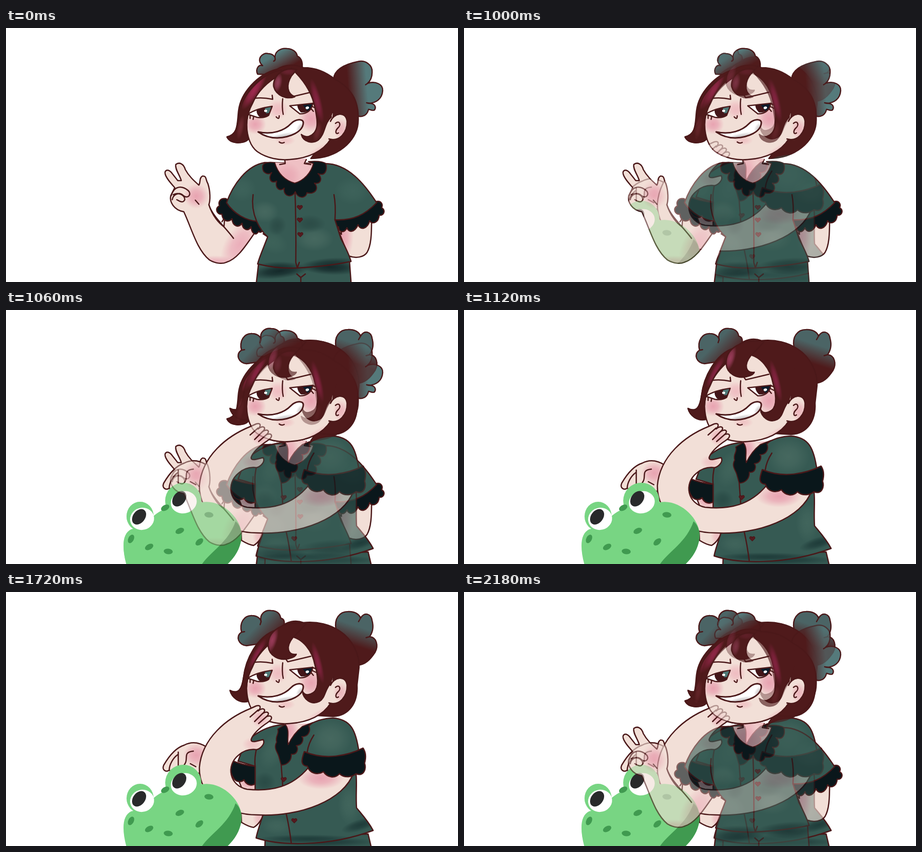
Recreate the animation shown at these times as an HTML page with a canvas. Size 900x506 px, loop 2240 ms.

```html
<!DOCTYPE html>
<html lang="en">
<meta charset="utf-8">
<title>Two poses</title>
<style>
  html, body { margin: 0; width: 100%; height: 100%; overflow: hidden; background: #fff; }
  canvas { display: block; }
</style>
<canvas id="stage" width="900" height="506"></canvas>
<script>
const INK = '#4a1819', HAIR = '#4f1a1b', WINE = '#852342', SKIN = '#f2dfd7', PINK = '#e8a3b1',
  SHIRT = '#365a53', LIGHT = '#46685f', SHADE = '#1f3c3a', BLACK = '#0a171b', TEAL = '#557a7b',
  FROG = '#78d583', MOSS = '#409a50';

let g;

function layer(paint) {
  const canvas = document.createElement('canvas');
  canvas.width = 900;
  canvas.height = 506;
  g = canvas.getContext('2d');
  g.lineCap = g.lineJoin = 'round';
  paint();
  return canvas;
}

// Soft elliptical patch of colour.
function glow([x, y, rx, ry, color, turn = 0]) {
  g.save();
  g.translate(x, y);
  g.rotate(turn);
  g.scale(rx, ry);
  const fade = g.createRadialGradient(0, 0, 0, 0, 0, 1);
  fade.addColorStop(0, color);
  fade.addColorStop(.45, color + 'bb');
  fade.addColorStop(1, color + '00');
  g.fillStyle = fade;
  g.fillRect(-1, -1, 2, 2);
  g.restore();
}

function line(d, width = 2.5, color = INK) {
  g.lineWidth = width;
  g.strokeStyle = color;
  g.stroke(new Path2D(d));
}

function shape(d, fill, glows = [], width = 2.5) {
  const path = new Path2D(d);
  g.fillStyle = fill;
  g.fill(path);
  g.save();
  g.clip(path);
  glows.forEach(glow);
  g.restore();
  if (width) line(d, width);
}

function oval(x, y, rx, ry, color, turn = 0) {
  g.fillStyle = color;
  g.beginPath();
  g.ellipse(x, y, rx, ry, turn, 0, 7);
  g.fill();
}

function blend(x0, y0, x1, y1, from, to) {
  const ramp = g.createLinearGradient(x0, y0, x1, y1);
  ramp.addColorStop(0, from);
  ramp.addColorStop(1, to);
  return ramp;
}

function heart(x, y) {
  shape(`M${x} ${y + 4}l-5 -5c-1 -4 4 -5 5 -1c1 -4 6 -3 5 1z`, '#571a20', [], 1.5);
}

function face() {
  shape('M545 92C512 105 480 150 479 192C480 217 486 235 500 246C520 260 545 264 565 262C602 260 632 245 646 222L652 170L618 118L575 82Z', SKIN, [
    [496, 192, 22, 20, PINK], [608, 181, 26, 27, PINK], [541, 162, 20, 20, '#efbcc1'],
    [556, 224, 20, 10, '#efc3c4'], [628, 248, 46, 14, '#edbfc2', -.5]]);
  line('M495 140Q512 138 531 142L530 134M561 139L607 128M556 132L561 139');
  line('M551 141Q549 158 552 172M538 177Q544 184 544 175');

  shape('M482 172Q499 160 530 156L523 174Q515 180 500 178Z', '#fff', [], 0);
  shape('M499 163Q513 157 530 156L523 174Q516 180 506 178Q498 172 499 163Z', '#421619', [], 0);
  shape('M515 158L530 156L525 169L518 170Z', '#4d7775', [], 0);
  oval(517, 165, 3, 2.5, '#fff');
  line('M481 172Q499 160 530 156L523 174Q515 180 500 178L482 172M486 175L486 180M493 177L492 182');

  shape('M565 155L611 150Q607 171 585 171Z', '#fff', [], 0);
  shape('M580 153L611 150Q608 170 587 168Q580 161 580 153Z', '#421619', [], 0);
  shape('M590 152L611 150Q609 164 600 165Z', '#0b1b2a', [], 0);
  oval(600, 159, 3.5, 2.5, '#fff', -.3);
  line('M565 155L611 150Q607 171 585 171ZM610 150L619 154M609 156L617 160M607 160L612 166');

  const mouth = 'M502 207C530 213 554 205 568 190C577 181 592 180 592 189C591 207 566 218 540 219C525 219 512 214 502 207Z';
  shape(mouth, '#fff', [[545, 219, 38, 8, '#c3bfc0', -.25], [587, 199, 8, 13, '#d4cfd0', .6]], 3);
  line('M544 227Q549 231 554 228');
}

function ear() {
  const rim = 'M646 186C652 170 677 164 679 186C680 208 664 227 643 221';
  shape(rim, SKIN, [[667, 201, 15, 21, '#ebb5bb']], 0);
  line(rim + 'M656 190C664 183 668 193 661 199C654 206 657 213 662 209');
}

function wavingPose() {
  shape('M501 92C496 82 503 72 511 75C497 63 510 48 522 51C530 51 536 56 536 62C533 47 547 39 560 41C573 42 579 49 580 56C590 60 592 73 588 86L540 94Z',
    blend(533, 55, 551, 86, TEAL, HAIR));
  line('M536 62Q536 65 533 66');
  shape('M652 102C654 82 675 72 700 67C716 63 730 74 729 88C729 100 725 106 720 110C736 105 751 112 750 125C749 140 738 150 721 150C733 149 738 156 734 163C731 166 726 163 722 162C718 178 704 179 694 172Z',
    blend(681, 119, 719, 116, HAIR, TEAL));
  line('M722 109L716 113M724 150L718 149');
  shape('M540 82C500 92 467 130 463 165C460 190 463 212 440 217C447 232 474 231 482 222L520 170L640 215L607 260C660 260 698 225 701 190C704 150 692 122 655 102C636 87 617 79 592 79C575 72 555 72 540 82Z', HAIR);

  shape('M503 468L497 520L688 520L684 465Z', SHIRT, [
    [545, 484, 60, 15, '#14292a', -.12], [645, 476, 62, 16, '#14292a', .05]]);
  line('M579 490L587 497L596 490M587 497V506');

  shape('M404 352C411 375 425 390 434 396L436 370L505 395C484 421 466 459 438 467C432 470 418 470 405 462C380 442 370 400 354 366C335 363 325 347 328 334L336 318C326 307 314 293 317 286C320 281 326 283 331 290L342 304L349 304C346 293 336 281 338 272C345 266 354 271 357 282C364 295 374 304 384 313C388 307 384 299 391 295C400 294 397 302 402 310C407 325 407 343 404 352Z', SKIN, [
    [379, 335, 25, 25, PINK], [465, 431, 29, 55, '#ebaeba', .55], [417, 468, 45, 15, '#ebaeba']]);
  line('M404 352C411 375 438 398 453 419M329 334C335 313 351 314 363 324C371 332 361 342 352 333C346 327 333 330 331 342M333 332C343 326 356 333 356 342C352 350 346 345 340 342M377 343L384 351');
  shape('M656 390L666 414L682 454C698 460 713 456 719 447C727 433 728 412 728 380Z', SKIN, [[670, 414, 22, 52, PINK]]);
  line('M667 402L668 411L663 406M430 386L438 374');

  shape('M438 340C427 338 422 346 425 354C415 360 420 372 430 371C431 385 443 388 450 380C451 395 463 399 470 389C471 402 482 406 488 396C489 410 498 415 503 405C509 411 514 401 508 394L500 380Z', BLACK);
  shape('M736 346C747 343 751 351 748 358C757 364 752 374 743 373C742 388 729 392 724 384C720 400 706 404 701 392C694 408 682 408 679 398C673 410 662 407 662 396C655 402 653 393 655 380Z', BLACK);
  shape('M515 268C479 274 452 312 439 348C455 372 479 383 499 385Q508 405 521 416C512 440 505 455 501 470Q540 480 580 478Q640 475 687 465C683 450 675 435 667 420L655 382C692 384 716 371 738 348C714 311 681 270 635 270Z', SHIRT, [
    [515, 366, 28, 22, LIGHT], [614, 420, 39, 25, LIGHT], [530, 427, 33, 22, '#3d6259', .4],
    [470, 320, 28, 26, '#3d625a'], [690, 324, 36, 28, '#3d625a'], [605, 390, 32, 18, '#2c4c47'],
    [540, 394, 18, 20, '#2c4c47', .5], [545, 478, 52, 13, '#1a3231'], [643, 471, 60, 13, '#1a3231', -.08]]);
  line('M499 385Q488 359 492 332M655 382Q657 353 653 332M521 416L512 410M575 313Q578 390 577 467L580 478L584 467');
  [[585, 358], [585, 383], [586, 412]].forEach(([x, y]) => heart(x, y));

  const neckline = 'C608 288 593 304 575 309C556 304 541 290 535 268';
  shape('M556 261L557 270L535 268L612 270' + neckline + 'L612 270L596 270L598 260Z', '#efc0c4', [[560, 295, 28, 28, '#e9a9b4']], 0);
  shape('M535 268C520 266 510 269 511 278C511 290 523 293 529 288C521 301 528 311 539 305C535 319 545 327 554 319C551 337 571 339 576 326C581 341 598 340 599 328C614 333 625 320 614 309C629 312 630 297 621 290C636 296 640 283 637 270C630 265 615 265 602 266L612 270' + neckline + 'Z', BLACK, [], 2);
  line('M555 262L556 270L545 272M598 262L594 270L607 272');
  face();
  ear();

  shape('M549 84C516 87 475 125 465 165C460 190 463 212 440 217C447 232 474 231 482 222C477 197 478 174 490 152C500 128 520 107 548 92Z', HAIR, [
    [494, 124, 12, 45, '#a02a50', .55], [467, 198, 7, 25, '#6e2a30', .2]]);
  shape('M568 80C586 97 606 122 613 150C622 187 624 208 603 216C596 218 591 214 588 212C592 228 611 231 622 223C636 211 633 190 648 177L662 128L628 86L590 80Z', HAIR, [
    [619, 145, 9, 46, WINE, -.25], [620, 207, 8, 21, '#69282d', .25]], 0);
  line('M568 80C586 97 606 122 613 150C622 187 624 208 603 216C596 218 591 214 588 212C592 228 611 231 622 223C636 211 633 190 648 177');
  shape('M579 83C549 76 530 99 533 117C538 135 559 143 575 137C560 131 557 114 568 96Z', HAIR, [
    [541, 109, 9, 20, '#94405a', .2], [562, 87, 18, 8, '#6a2330']]);
}

function frog() {
  oval(267, 411, 27, 29, FROG);
  oval(353, 380, 36, 36, FROG);
  shape('M240 508C230 472 232 445 249 437C280 432 291 405 318 396L390 383C430 376 470 416 469 449C468 475 454 494 440 508Z', FROG, [], 0);
  shape('M389 508C407 481 443 463 457 421Q470 432 469 454C466 478 454 494 439 508Z', MOSS, [], 0);
  [[271, 416, 24, 22, 265, 412], [354, 383, 26, 22, 345, 376]].forEach(([x, y, rx, ry, px, py]) => {
    oval(x, y, rx, ry, '#fff', -.25);
    oval(px, py, 12, 17, '#292a2b', .65);
  });
  [[317, 394, -.5], [404, 408, .1], [346, 440, -.4], [385, 462, -.7], [285, 472, -.5], [323, 481, .1], [249, 456, -1.1]]
    .forEach(([x, y, turn]) => oval(x, y, 9, 5.5, MOSS, turn));
}

function thinkingPose() {
  shape('M479 107C463 106 456 88 469 80C464 62 474 46 490 47C500 47 507 53 508 59C504 44 516 35 528 37C540 37 546 44 547 52C556 54 556 64 550 72L512 102Z',
    blend(495, 72, 528, 104, '#4b6465', HAIR));
  line('M508 59L506 65M469 80L475 79');
  shape('M657 74C653 53 664 39 681 39C696 38 704 46 706 52C714 39 727 43 729 57C733 72 729 82 724 89C738 90 742 107 735 120C725 135 715 146 698 146Z',
    blend(699, 68, 687, 104, '#4b6465', HAIR));
  line('M706 52L702 59M724 89L717 91');
  shape('M545 72C558 58 577 55 592 61C620 58 646 65 665 78C690 94 704 125 703 150L699 185C701 221 683 246 652 248L618 246L640 215L522 170L482 218C465 222 450 211 446 196C465 206 470 190 473 170C477 141 491 110 522 85Z', HAIR);

  shape('M516 492L515 520L730 520L721 482Z', SHIRT, [[630, 498, 110, 10, SHADE]]);
  shape('M468 440L469 459Q484 468 493 469Q507 461 515 438Z', SKIN, [[505, 451, 14, 18, '#edbcc0']]);
  shape('M400 309C386 300 370 297 355 305C339 310 325 326 314 345C310 354 318 360 325 355L333 361L389 361Z', SKIN, [[379, 325, 26, 24, PINK]]);
  line('M325 355C325 344 333 330 342 324M343 319V350M373 317C350 319 365 334 355 344M378 348L367 342');

  shape('M458 362Q475 368 500 378L500 397L470 392Z', SKIN, [[484, 378, 25, 18, PINK]]);
  shape('M555 264C514 266 474 292 468 321L462 337L496 347V400L513 440C505 465 500 478 498 490C543 505 640 509 731 475C721 456 707 441 698 430C696 399 700 374 696 355L703 320C697 276 687 253 650 251C628 252 617 258 605 263Z', SHIRT, [
    [646, 292, 42, 38, LIGHT], [530, 316, 24, 40, '#40645b', .4], [540, 466, 32, 18, '#40645b'],
    [684, 424, 23, 40, '#41655c'], [706, 464, 40, 12, SHADE, -.3], [600, 492, 100, 9, SHADE], [515, 379, 22, 21, '#2a4b46']]);
  line('M496 347Q494 330 500 307M600 318Q602 302 613 285M548 345L552 400M558 442Q564 468 568 500');
  heart(553, 374);
  heart(574, 456);
  shape('M448 335C444 350 448 364 454 372C460 380 470 378 474 374C478 385 490 387 496 382L496 347Q470 345 448 335Z', BLACK);

  shape('M554 262L562 302L602 262Z', SKIN, [[562, 276, 22, 27, PINK], [602, 258, 28, 13, '#edb6bd']], 0);
  shape('M556 264L541 273C545 284 535 286 539 299C532 311 541 319 543 327L548 345C563 344 569 333 568 323C580 325 583 312 578 306C592 305 593 292 589 288C603 289 607 275 603 267L611 260L590 268C576 279 568 291 562 304C559 291 566 276 556 264Z', BLACK, [], 2);
  face();
  ear();

  shape('M537 76C500 88 477 134 473 170C470 192 464 205 446 196C450 211 465 222 481 217C476 192 479 172 490 151C500 126 514 108 532 91Z', HAIR, [
    [500, 124, 8, 36, WINE, .5]]);
  const rightLock = 'M564 88C592 92 610 118 615 145C624 177 622 198 607 203C598 207 593 203 590 197C592 214 608 226 624 218C637 210 634 194 648 180';
  shape(rightLock + 'L665 128L636 80L592 65Z', HAIR, [[621, 141, 8, 43, WINE, -.25]], 0);
  line(rightLock);
  shape('M598 63C552 57 520 77 522 108C524 128 544 137 562 133C572 131 577 128 578 124C560 126 557 109 571 91Z', HAIR, [
    [530, 96, 10, 28, '#9a3c5a', .3]]);

  shape('M692 360C674 414 586 449 500 444C438 444 384 407 385 350C390 291 440 251 487 232L498 227C508 224 508 231 502 237C512 228 520 235 511 242C520 236 527 241 519 248C530 244 533 252 521 260C504 271 491 284 488 294C488 302 502 296 512 294C517 302 507 312 499 314C483 312 471 318 463 325C437 346 445 386 480 393C530 398 570 388 602 350Z', SKIN, [
    [506, 252, 18, 18, '#ebb4bb'], [627, 371, 46, 22, PINK], [491, 303, 21, 14, '#efc3c4']]);
  line('M502 235L486 249M511 242L495 258M519 248L503 262');
  shape('M594 318C588 335 586 346 600 347C605 362 620 365 632 358C640 370 655 372 664 362C675 372 690 368 697 362C712 368 718 353 714 341C718 327 715 317 711 311C680 326 636 336 594 318Z', BLACK);
  frog();
}

const waving = layer(wavingPose), thinking = layer(thinkingPose);
const stage = document.getElementById('stage').getContext('2d');

function put(image, alpha = 1, mode = 'source-over') {
  stage.globalAlpha = alpha;
  stage.globalCompositeOperation = mode;
  stage.drawImage(image, 0, 0);
}

// Dissolve: first inside the old silhouette only, then across both.
const steps = [
  [1000, () => put(waving)],
  [1060, () => { put(waving); put(thinking, .37, 'source-atop'); }],
  [1120, () => { put(thinking); put(waving); put(thinking, .63); }],
  [2120, () => put(thinking)],
  [2180, () => { put(thinking); put(waving, .37, 'source-atop'); }],
  [2240, () => { put(thinking); put(waving); put(thinking, .37); }]
];

function tick() {
  const time = performance.now() % 2240;
  stage.clearRect(0, 0, 900, 506);
  steps.find(([end]) => time < end)[1]();
  requestAnimationFrame(tick);
}
tick();
</script>
</html>
```
